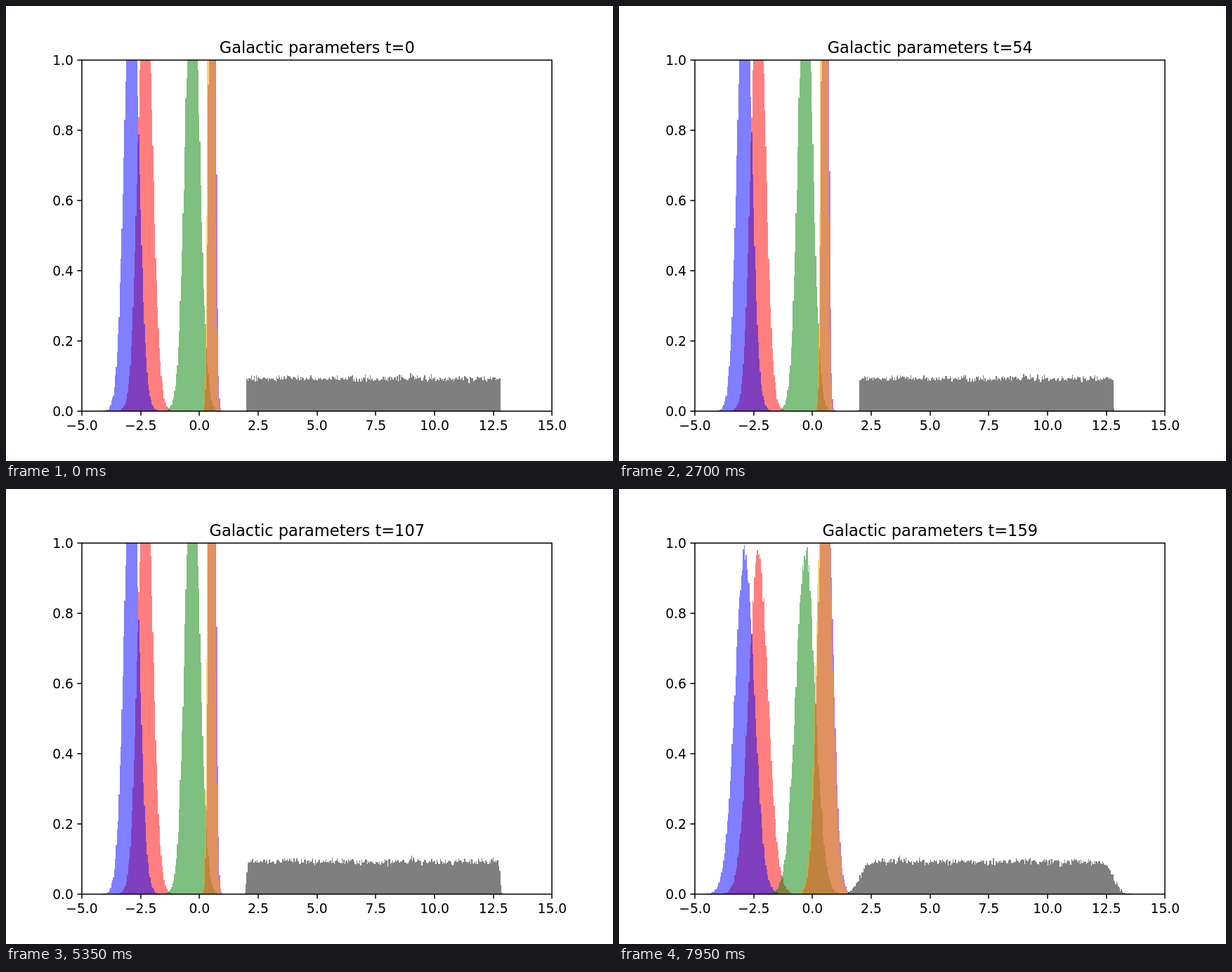
Animation, 864 px wide and 648 px high, one loop 8 s. Source, as an HTML page:

```html
<!DOCTYPE html>
<html lang="en">
<head>
<meta charset="utf-8">
<title>Galactic parameters</title>
<style>
  html, body { margin: 0; width: 100%; height: 100%; overflow: hidden; background: #fff; }
  svg { display: block; width: 864px; height: 648px; }
  text { font: 18.75px "DejaVu Sans", sans-serif; fill: #000; text-anchor: middle; }
  #title { font-size: 22.5px; }
  .left text { text-anchor: end; }
  #bars path { fill-opacity: .5; shape-rendering: crispEdges; }
  #axes path { fill: none; stroke: #000; stroke-width: 1.5; }
</style>
</head>
<body>
<svg viewBox="0 0 864 648">
  <g id="bars"></g>
  <g id="axes"></g>
  <text id="title" x="442.8" y="67"></text>
</svg>
<script>
const STEP_MS = 50, STEPS = 160;
const SAMPLES = 100000, BIN = 0.04, X_MIN = -5, X_MAX = 15;
const BINS = Math.round((X_MAX - X_MIN) / BIN);
const LEFT = 108, RIGHT = 777.4, TOP = 77.4, BOTTOM = 576.72;

const toX = v => LEFT + (v - X_MIN) / (X_MAX - X_MIN) * (RIGHT - LEFT);
const toY = v => BOTTOM - v * (BOTTOM - TOP);
const pixelX = v => Math.round(toX(v));
const pixelY = v => Math.round(toY(v));

function add(parent, tag, attrs, text = '') {
  const el = document.createElementNS('http://www.w3.org/2000/svg', tag);
  for (const key in attrs) el.setAttribute(key, attrs[key]);
  el.textContent = text;
  return parent.appendChild(el);
}

let seed = 20417;
function random() {
  seed = seed + 0x6D2B79F5 | 0;
  let n = Math.imul(seed ^ seed >>> 15, 1 | seed);
  n = n + Math.imul(n ^ n >>> 7, 61 | n) ^ n;
  return ((n ^ n >>> 14) >>> 0) / 4294967296;
}
const normal = () =>
  Math.sqrt(-2 * Math.log(1 - random())) * Math.cos(2 * Math.PI * random());
const gaussian = (mean, sd) => () => mean + sd * normal();

const bars = document.getElementById('bars');
const populations = [
  ['#f00', gaussian(-2.3, 0.3)],
  ['#00f', gaussian(-2.89, 0.3)],
  ['#008000', gaussian(-0.3, 0.3)],
  ['#800080', gaussian(0.55, 0.1)],
  ['#ffa500', gaussian(0.5, 0.1)],
  ['#000', () => 2 + 10.8 * random()]
].map(([fill, draw]) => ({
  start: Float64Array.from({ length: SAMPLES }, draw),
  drift: Float64Array.from({ length: SAMPLES }, normal),
  path: add(bars, 'path', { fill })
}));

// The drift's variance grows exponentially with each step.
const spreadAt = step => Math.sqrt(0.079 * Math.exp(0.079 * (step - 159)));

function histogramPath({ start, drift }, spread) {
  const counts = new Uint32Array(BINS);
  for (let i = 0; i < SAMPLES; i++) {
    const bin = Math.floor((start[i] + spread * drift[i] - X_MIN) / BIN);
    if (bin >= 0 && bin < BINS) counts[bin]++;
  }
  const base = pixelY(0);
  let d = '';
  counts.forEach((count, i) => {
    if (!count) return;
    const density = Math.min(1, count / (SAMPLES * BIN));
    const x0 = pixelX(X_MIN + i * BIN);
    const x1 = pixelX(X_MIN + (i + 1) * BIN);
    d += `M${x0} ${base}V${pixelY(density)}H${x1}V${base}Z`;
  });
  return d;
}

function drawAxes() {
  const axes = document.getElementById('axes');
  const yLabels = add(axes, 'g', { class: 'left' });
  const label = v => v.toFixed(1).replace('-', '\u2212');
  const base = pixelY(0);
  let d = `M${LEFT} ${pixelY(1)}H${pixelX(X_MAX)}V${base}H${LEFT}Z`;
  for (let v = X_MIN; v <= X_MAX; v += 2.5) {
    d += `M${pixelX(v)} ${base}v6.56`;
    add(axes, 'text', { x: toX(v), y: 604 }, label(v));
  }
  for (let i = 0; i <= 5; i++) {
    const y = pixelY(i / 5);
    d += `M${LEFT} ${y}h-6.56`;
    add(yLabels, 'text', { x: 96, y: y + 7 }, label(i / 5));
  }
  add(axes, 'path', { d });
}

const title = document.getElementById('title');
const cache = [];
let shown = -1;

function render(now) {
  const step = Math.floor(now / STEP_MS) % STEPS;
  if (step !== shown) {
    shown = step;
    cache[step] ||= populations.map(p => histogramPath(p, spreadAt(step)));
    populations.forEach((p, i) => p.path.setAttribute('d', cache[step][i]));
    title.textContent = `Galactic parameters t=${step}`;
  }
}

drawAxes();
render(0);
const began = performance.now();
requestAnimationFrame(function tick() {
  render(performance.now() - began);
  requestAnimationFrame(tick);
});
</script>
</body>
</html>
```
